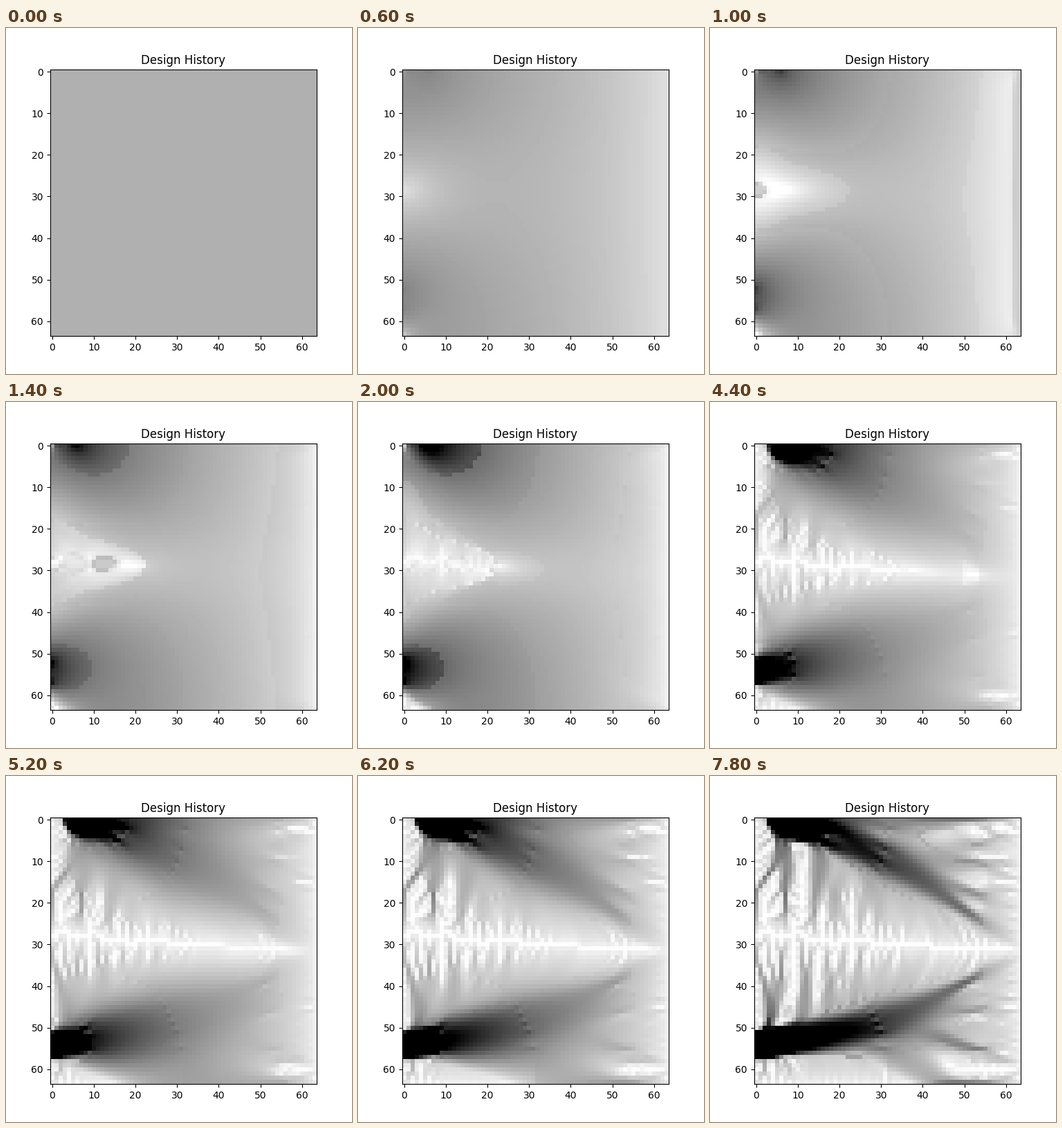
Recreate the animation shown at these times as a matplotlib script. Size 500x500 px, loop 8000 ms.

```python
import numpy as np
import matplotlib.pyplot as plt
from matplotlib.animation import FuncAnimation

N = 64              # elements per side
VOL = 0.31          # share of solid material
PENAL = 3
XMIN = 1e-3
LOAD = 9.267e-4     # heat fed into every node
RMIN = 1.1
SPAN, GROW, SHRINK = 0.2, 1.05, 0.65    # moving asymptotes
HOLD = 3            # frames showing the uniform start
FRAMES = 40

sink = np.zeros((N + 1, N + 1))
sink[0, 2:7] = 1e6
sink[53:58, 0] = 1e6


def band(k, diag, off):
    """Assemble a row of two-node links with weights k."""
    m = np.zeros((N + 1, N + 1))
    i = np.arange(N)
    m[i, i] += diag * k
    m[i + 1, i + 1] += diag * k
    m[i, i + 1] = m[i + 1, i] = off * k
    return m


def temperature(k):
    """Solve steady conduction by block elimination, one node row at a time."""
    pad = np.vstack([np.zeros(N), k, np.zeros(N)])
    gains, parts = [], []
    for j in range(N + 1):
        a = band(pad[j] + pad[j + 1], 2 / 3, -1 / 6) + np.diag(sink[j])
        f = np.full(N + 1, LOAD)
        if j:
            b = band(pad[j], -1 / 6, -1 / 3)
            a = a - b @ gains[-1]
            f = f - b @ parts[-1]
        link = band(pad[j + 1], -1 / 6, -1 / 3)
        sol = np.linalg.solve(a, np.column_stack([link, f]))
        gains.append(sol[:, :-1])
        parts.append(sol[:, -1])
    t = np.zeros((N + 1, N + 1))
    t[N] = parts[N]
    for j in range(N - 1, -1, -1):
        t[j] = parts[j] - gains[j] @ t[j + 1]
    return t


def blur(v):
    """Cone-weighted sum over each cell and its four neighbours."""
    p = np.pad(v, 1)
    near = p[:-2, 1:-1] + p[2:, 1:-1] + p[1:-1, :-2] + p[1:-1, 2:]
    return RMIN * v + (RMIN - 1) * near


WEIGHT = blur(np.ones((N, N)))


def gain(x):
    """Filtered benefit of adding material to each cell."""
    t = temperature(x ** PENAL)
    a, b, c, d = t[:-1, :-1], t[:-1, 1:], t[1:, 1:], t[1:, :-1]
    sides = (a - b) ** 2 + (b - c) ** 2 + (c - d) ** 2 + (d - a) ** 2
    energy = sides / 6 + ((a - c) ** 2 + (b - d) ** 2) / 3
    g = PENAL * x ** (PENAL - 1) * energy
    return blur(x * g) / (x * WEIGHT)


def mma_step(x, g, low, upp):
    """Minimise the moving-asymptote model under the volume limit."""
    lo = np.maximum(XMIN, low + 0.1 * (x - low))
    hi = np.minimum(1, upp - 0.1 * (upp - x))
    du, dl = (upp - x) ** 2, (x - low) ** 2
    p0, q0 = (0.001 * g + 1e-5) * du, (1.001 * g + 1e-5) * dl
    p1, q1 = 1.001 * du, 0.001 * dl
    limit = np.sum(p1 / (upp - x) + q1 / (x - low)) - (x.sum() - VOL * N * N)
    a, b = -12.0, 12.0
    for _ in range(60):
        mid = (a + b) / 2
        sp, sq = np.sqrt(p0 + 10 ** mid * p1), np.sqrt(q0 + 10 ** mid * q1)
        new = np.clip((sp * low + sq * upp) / (sp + sq), lo, hi)
        if np.sum(p1 / (upp - new) + q1 / (new - low)) > limit:
            a = mid
        else:
            b = mid
    return new


def optimise(steps):
    x = np.full((N, N), VOL)
    hist = [x]
    for it in range(steps):
        if it < 2:
            low, upp = x - SPAN, x + SPAN
        else:
            old, older = hist[-2], hist[-3]
            trend = (x - old) * (old - older)
            f = np.where(trend > 0, GROW, np.where(trend < 0, SHRINK, 1.0))
            low = np.clip(x - f * (old - low), x - 10, x - 0.01)
            upp = np.clip(x + f * (upp - old), x + 0.01, x + 10)
        x = mma_step(x, gain(x), low, upp)
        hist.append(x)
    return hist


designs = optimise(FRAMES - HOLD)

fig, ax = plt.subplots(figsize=(5, 5), dpi=100)
img = ax.imshow(designs[0], cmap="gray_r", vmin=0, vmax=1)
ax.set_title("Design History")


def draw(i):
    img.set_data(designs[max(0, i - HOLD + 1)])
    return (img,)


anim = FuncAnimation(fig, draw, frames=FRAMES, interval=200,
                     repeat=True, repeat_delay=0)
plt.show()
```
